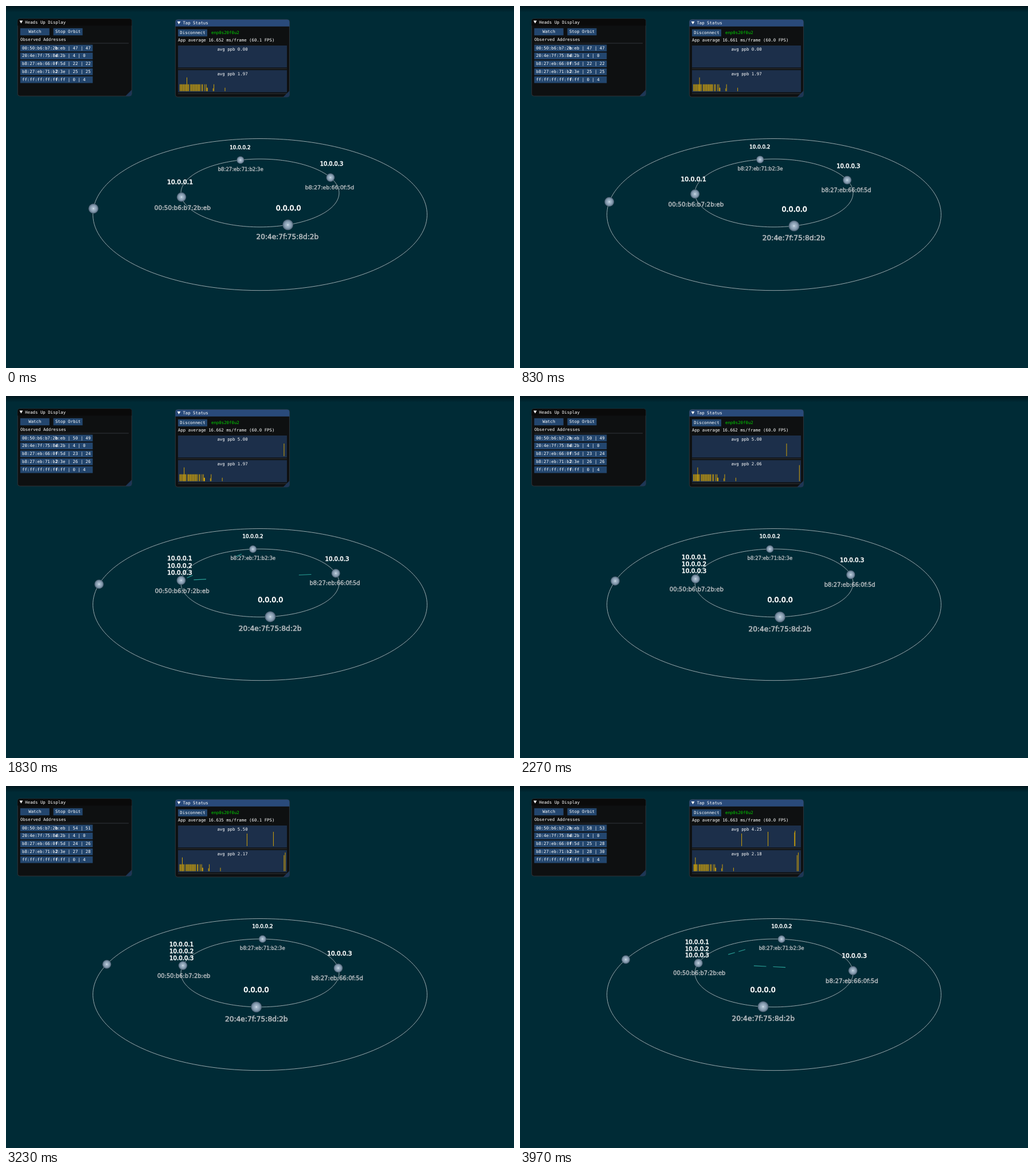
An HTML page for the animation above (4.01 s loop, 886 px wide and 632 px high).

```html
<!DOCTYPE html>
<html lang="en">
<head>
<meta charset="utf-8">
<title>Network orbit</title>
<style>
  html, body { margin: 0; width: 100%; height: 100%; overflow: hidden; background: #002b36; }
  svg { display: block; width: 886px; height: 632px; }
  .ui { font: 7.37px "DejaVu Sans Mono", monospace; fill: #fff; white-space: pre; }
  .mid { text-anchor: middle; }
  .button { fill: #23466e; }
  .frame { fill: #1c2f4a; }
  .rule { stroke: #3c3d45; stroke-width: .8; }
  .bars { stroke: #d0a208; fill: none; }
  .ring { stroke: #b4bdc1; stroke-width: .85; fill: none; }
  .packet { stroke: #2aa198; stroke-width: 1.1; }
  .label { font: 10.15px "DejaVu Sans", sans-serif; text-anchor: middle; }
  .ip { fill: #fff; stroke: #fff; stroke-width: .65; }
  .mac { fill: #b3b9bd; stroke: #b3b9bd; stroke-width: .5; }
</style>
</head>
<body>
<svg id="stage" viewBox="0 0 886 632">
  <defs>
    <linearGradient id="shade" x2="0" y2="1">
      <stop offset="0" stop-color="#00161d"/><stop offset="1" stop-color="#002b36"/>
    </linearGradient>
    <radialGradient id="ball">
      <stop offset="0" stop-color="#e4edf6"/><stop offset=".18" stop-color="#a9bccd"/>
      <stop offset=".65" stop-color="#8399ad"/><stop offset=".88" stop-color="#5f7488"/>
      <stop offset="1" stop-color="#34495a"/>
    </radialGradient>
    <clipPath id="plot"><rect x="302" y="69" width="187" height="82"/></clipPath>
  </defs>
  <rect width="886" height="632" fill="#002b36"/>
  <rect width="886" height="11" fill="url(#shade)"/>
  <g id="scene"></g>
  <g id="panels"></g>
</svg>
<script>
const LOOP = 4010, FPS = 30, LAST = 119;
const scene = document.getElementById('scene');
const panels = document.getElementById('panels');

function add(parent, tag, attrs = {}, text = '') {
  const el = document.createElementNS('http://www.w3.org/2000/svg', tag);
  for (const name in attrs) el.setAttribute(name, attrs[name]);
  el.textContent = text;
  parent.append(el);
  return el;
}
function set(el, attrs) {
  for (const name in attrs) el.setAttribute(name, attrs[name]);
}
function setText(el, text) {
  if (el.textContent !== text) el.textContent = text;
}
// Value of the last [start, value] entry that has begun.
const stepAt = (steps, now) => steps.filter(s => s[0] <= now).pop()[1];

// Perspective camera looking down at the orbit plane.
function project(radius, angle, height = 0) {
  const depth = 1 - 0.183 * radius * Math.sin(angle) - 0.0855 * height;
  return {
    x: 443 + 135.6 * radius * Math.cos(angle) / depth,
    y: 315.6 + (57.4 * radius * Math.sin(angle) - 122.9 * height) / depth,
    scale: 1 / depth
  };
}
const rad = degrees => degrees * Math.PI / 180;

// Orbits and hosts
for (const radius of [1, 2]) {
  const points = Array.from({ length: 180 }, (_, i) => {
    const p = project(radius, rad(i * 2));
    return p.x.toFixed(2) + ',' + p.y.toFixed(2);
  });
  add(scene, 'polygon', { class: 'ring', points: points.join(' ') });
}

const ROUTER = 1, BASELINE = 3.1, LINE = 11.8;
const hosts = [
  { mac: '20:4e:7f:75:8d:2b', ip: '0.0.0.0', radius: 1, phase: 0 },
  { mac: '00:50:b6:b7:2b:eb', ip: '10.0.0.1', radius: 1, phase: 90 },
  { mac: 'b8:27:eb:71:b2:3e', ip: '10.0.0.2', radius: 1, phase: 180 },
  { mac: 'b8:27:eb:66:0f:5d', ip: '10.0.0.3', radius: 1, phase: 270 },
  { radius: 2, phase: 90 }
];
const packets = [2, 3].flatMap(peer => [
  { from: ROUTER, to: peer, delay: 1775 },
  { from: peer, to: ROUTER, delay: 1738 }
]);
for (const p of packets) p.el = add(scene, 'line', { class: 'packet' });
for (const h of hosts) h.ball = add(scene, 'circle', { fill: 'url(#ball)' });
for (const h of hosts.filter(h => h.mac)) {
  h.macEl = add(scene, 'text', { class: 'label mac', y: BASELINE }, h.mac);
  h.ipEl = add(scene, 'g', { class: 'label ip' });
  const lines = h === hosts[ROUTER] ? ['10.0.0.1', '10.0.0.2', '10.0.0.3'] : [h.ip];
  h.lines = lines.map(line => add(h.ipEl, 'text', { y: BASELINE }, line));
}

function place(el, p) {
  el.setAttribute('transform', `translate(${p.x} ${p.y}) scale(${p.scale})`);
}

function drawScene(ms) {
  const turn = 72.8 + 6 * ms / 1000;
  for (const h of hosts) {
    const angle = rad(turn + h.phase);
    h.at = project(h.radius, angle);
    set(h.ball, { cx: h.at.x, cy: h.at.y, r: 7.8 * h.at.scale });
    if (!h.mac) continue;
    place(h.ipEl, project(1, angle, 0.2));
    place(h.macEl, project(1, angle, -0.15));
  }
  const resolved = ms >= 1760;
  hosts[ROUTER].lines.forEach((line, i) => {
    line.setAttribute('y', BASELINE + (resolved ? (i - 1) * LINE : 0));
    line.setAttribute('visibility', resolved || i === 0 ? 'visible' : 'hidden');
  });
  for (const { el, from, to, delay } of packets) {
    const age = ms - delay;
    const mid = age < 0 ? -1 : (age % 1000) / 480;
    const a = hosts[from].at, b = hosts[to].at;
    const mix = (f, axis) => a[axis] + (b[axis] - a[axis]) * f;
    const tail = Math.max(0, mid - 0.04), head = mid + 0.04;
    set(el, {
      x1: mix(tail, 'x'), y1: mix(tail, 'y'), x2: mix(head, 'x'), y2: mix(head, 'y'),
      visibility: mid >= 0 && head < 0.98 ? 'visible' : 'hidden'
    });
  }
}

// Panels
const label = (x, y, text, attrs = {}) =>
  add(panels, 'text', { class: 'ui', x, y: y + 2.1, ...attrs }, text);
const rect = (x, y, width, height, attrs) =>
  add(panels, 'rect', { x, y, width, height, ...attrs });
const rule = (x, y, width) =>
  add(panels, 'line', { class: 'rule', x1: x, x2: x + width, y1: y, y2: y });

function button(x, y, text) {
  rect(x, y, 51, 12.4, { class: 'button' });
  label(x + 25.5, y + 6.2, text, { class: 'ui mid' });
}
function panel(x, y, height, title, bar) {
  const w = 199, r = x + w, b = y + height;
  rect(x, y, w, height, { rx: 4, fill: '#0e1011', stroke: '#393c42', 'stroke-width': .8 });
  add(panels, 'path', { fill: bar, d: `M${x} ${y + 12}v-8q0-4 4-4h${w - 8}q4 0 4 4v8z` });
  add(panels, 'path', { fill: '#1d3656', d: `M${r} ${b - 11}V${b - 4}q0 4-4 4H${r - 11}z` });
  add(panels, 'path', { fill: '#fff', d: `M${x + 3.2} ${y + 3.3}h5.8l-2.9 5z` });
  label(x + 13, y + 6.2, title);
}

panel(20.3, 22.2, 135, 'Heads Up Display', '#0a0a0a');
button(24.8, 38.8, 'Watch');
button(82.6, 38.8, 'Stop Orbit');
label(25, 58.4, 'Observed Addresses');
rule(25, 65, 189);

const counters = [
  ['00:50:b6:b7:2b:eb', '47 | 47', '50 | 49', '54 | 51', '58 | 53'],
  ['20:4e:7f:75:8d:2b', '4 | 0'],
  ['b8:27:eb:66:0f:5d', '22 | 22', '23 | 24', '24 | 26', '25 | 28'],
  ['b8:27:eb:71:b2:3e', '25 | 25', '26 | 26', '27 | 28', '28 | 30'],
  ['ff:ff:ff:ff:ff:ff', '0 | 4']
].map(([mac, ...values], i) => {
  const y = 67.6 + i * 13.8;
  rect(24.8, y, 126.5, 11.7, { class: 'button' });
  const el = label(28, y + 5.9, '');
  label(86.6, y + 5.9, mac[13]);
  return { mac, values, el };
});

panel(295.4, 23.7, 135.2, 'Tap Status', '#294a7a');
button(300, 40.7, 'Disconnect');
label(358, 47, 'enp0s20f0u2', { style: 'fill:#00d000' });
const rateText = label(300, 60.2, '');
function plot(y) {
  rect(300, y, 190, 38.5, { class: 'frame' });
  return {
    bars: add(panels, 'path', { class: 'bars', 'clip-path': 'url(#plot)' }),
    text: label(395, y + 6.7, '', { class: 'ui mid' })
  };
}
const live = plot(69);
rule(300, 109.7, 190);
const history = plot(112);
rule(300, 153, 190);

const rates = [
  [0, '16.652 ms/frame (60.1'], [230, '16.663 ms/frame (60.0'], [830, '16.661 ms/frame (60.0'],
  [1500, '16.662 ms/frame (60.0'], [2270, '16.658 ms/frame (60.0'],
  [3000, '16.635 ms/frame (60.1'], [3600, '16.663 ms/frame (60.0']
];
const liveAverage = [[0, '0.00'], [1745, '5.00'], [2743, '5.50'], [3745, '4.25']];
const pastAverage = [[0, '1.97'], [2160, '2.06'], [2830, '2.17'], [3830, '2.18']];
const bursts = [[1745, 22], [2743, 25], [3745, 24], [3765, 27]];

// Past samples as [x, height]: a dense run, then a few stragglers.
const past = [];
for (let i = 0; i < 27; i++) {
  if (i % 13 !== 11) past.push([303.5 + i * 1.52, 12]);
}
past.push([315.5, 24], [346.7, 12], [349.2, 12], [350.3, 6], [351.3, 6],
          [361.2, 5], [362.6, 12], [382, 6], [492.9, 28], [495, 32.5]);

const column = (x, bottom, height) => `M${x.toFixed(2)} ${bottom}v${-height}`;

function drawPanels(ms, frame) {
  const round = stepAt([[0, 0], [1760, 1], [2760, 2], [3760, 3]], ms);
  for (const { mac, values, el } of counters) {
    setText(el, mac + ' | ' + values[Math.min(round, values.length - 1)]);
  }
  setText(rateText, `App average ${stepAt(rates, ms)} FPS)`);
  setText(live.text, 'avg ppb ' + stepAt(liveAverage, ms));
  setText(history.text, 'avg ppb ' + stepAt(pastAverage, ms));

  live.bars.setAttribute('d', bursts.filter(([born]) => born <= ms)
    .map(([born, height]) => column(489 - (ms - born) * 0.0461, 105, height)).join(''));

  const shift = 0.8 * Math.floor((frame + 5) / 10);
  history.bars.setAttribute('d', past.filter(([x]) => x - shift < 488)
    .map(([x, height]) => column(x - shift, 148.7, height)).join(''));
}

function draw(now) {
  const frame = Math.min(LAST, Math.floor((now % LOOP + 5) * FPS / 1000));
  const ms = frame * 1000 / FPS;
  drawScene(ms);
  drawPanels(ms, frame);
}

let start;
function tick(now) {
  start ??= now;
  draw(now - start);
  requestAnimationFrame(tick);
}
draw(0);
requestAnimationFrame(tick);
</script>
</body>
</html>
```
